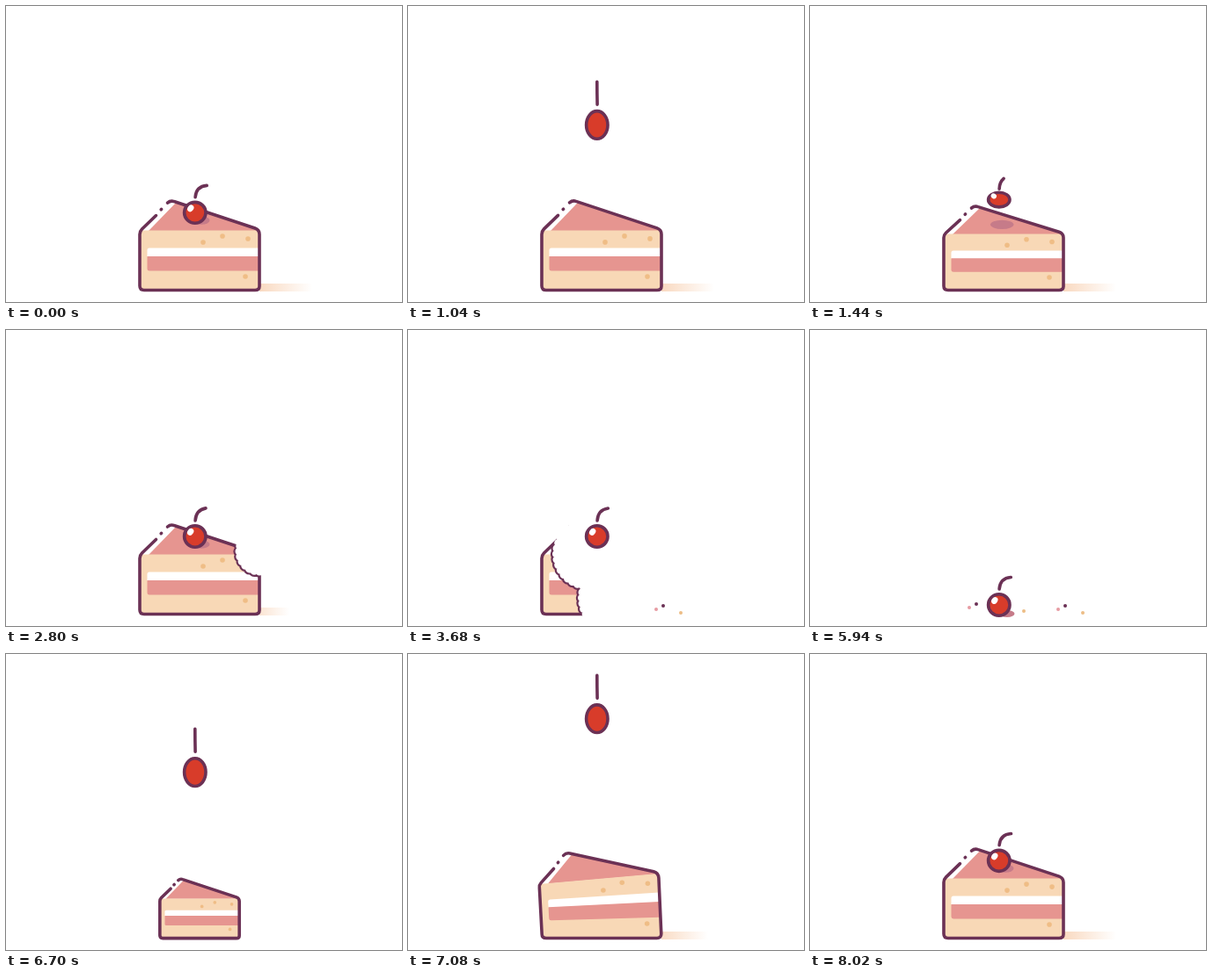
Recreate the animation shown at these times as an HTML page. Size 450 by 337 pixels, loop 8.04 s.

```html
<!DOCTYPE html>
<html lang="en">
<head>
<meta charset="utf-8">
<title>Cake slice</title>
<style>
html, body { margin: 0; width: 100%; height: 100%; overflow: hidden; background: #fff; }
svg { display: block; width: 100%; height: 100%; }
.line { fill: none; stroke: #6b3155; stroke-width: 3.6; stroke-linecap: round; stroke-linejoin: round; }
</style>
</head>
<body>
<svg viewBox="0 0 450 337">
  <defs>
    <linearGradient id="fade">
      <stop offset="0" stop-color="#f9d9c0"/>
      <stop offset="1" stop-color="#f9d9c0" stop-opacity="0"/>
    </linearGradient>
    <clipPath id="inside"><path id="clip"/></clipPath>
  </defs>
  <rect id="floor" x="288" y="316" height="9" fill="url(#fade)"/>
  <g id="cake">
    <path id="base" fill="#fff"/>
    <g id="fills"></g>
    <ellipse id="topShade" fill="#c67b89"/>
    <path id="outline" class="line"/>
    <g clip-path="url(#inside)"><path id="rims" fill="#6b3155"/></g>
    <path id="holes" fill="#fff"/>
  </g>
  <ellipse id="floorShade" fill="#c67b89" cx="224" cy="323" ry="4"/>
  <g id="crumbs"></g>
  <g id="cherry">
    <path id="stem" class="line"/>
    <ellipse id="ball" rx="12.2" fill="#d83c2a" stroke="#6b3155" stroke-width="3.6"/>
    <ellipse id="shine" rx="3.3" fill="#fff"/>
  </g>
</svg>
<script>
const LOOP = 8040, TAU = 2 * Math.PI;
const $ = id => document.getElementById(id);
const set = (el, attrs) => { for (const a in attrs) el.setAttribute(a, attrs[a]); };
const clamp = v => Math.min(1, Math.max(0, v));
const mix = (a, b, p) => a + (b - a) * p;
const smooth = v => { const p = clamp(v); return p * p * (3 - 2 * p); };
const add = (parent, tag, attrs) => {
  const el = document.createElementNS('http://www.w3.org/2000/svg', tag);
  set(el, attrs);
  parent.appendChild(el);
  return el;
};

// Damped swing that starts at zero when d = 0.
const ring = (d, period, decay) => d > 0 ? Math.exp(-d / decay) * Math.sin(TAU * d / period) : 0;

// Heights are those of the cherry's lowest point.
const G = .0026, REBOUND = .25, CAKE_TOP = 249, GROUND = 327, PEAK = 91.5;
const fallTime = h => Math.sqrt(2 * h / G);

const HOP = 818, HOP_RISE = 99, HOP_LAND = HOP + 2 * fallTime(HOP_RISE);
const DROP = 4015, DROP_LAND = DROP + fallTime(GROUND - CAKE_TOP);
const LEAP = 6440, LEAP_LAND = HOP_LAND + 6140, LEAP_TOP = LEAP_LAND - fallTime(CAKE_TOP - PEAK);
const GONE = 4400, REBORN = 6640;

const flights = [
  { start: HOP, land: HOP_LAND, crouch: 178, power: 1 },
  { start: DROP, land: DROP_LAND, crouch: 0, power: .75 },
  { start: LEAP, land: LEAP_LAND, crouch: 500, power: 1 }
];

function bounce(d, rise) {
  for (; rise > .4; rise *= REBOUND) {
    const span = 2 * fallTime(rise);
    if (d < span) return G / 2 * d * (span - d);
    d -= span;
  }
  return 0;
}

function cherryBottom(t) {
  if (t < HOP) return CAKE_TOP;
  if (t < DROP) return CAKE_TOP - bounce(t - HOP, HOP_RISE);
  if (t < DROP_LAND) return CAKE_TOP + G / 2 * (t - DROP) ** 2;
  if (t < LEAP) return GROUND - bounce(t - DROP_LAND, (GROUND - CAKE_TOP) * REBOUND);
  if (t < LEAP_TOP) return mix(PEAK, GROUND, (1 - (t - LEAP) / (LEAP_TOP - LEAP)) ** 3);
  return PEAK + G / 2 * (t - LEAP_TOP) ** 2;
}

// Stretch of the ball and straightness of the stem: crouch, fly, land and wobble.
function cherryPose(t) {
  let squeeze = 0, bow = 0;
  for (const { start, land, crouch, power } of flights) {
    const wait = t - start + crouch, d = t - land;
    if (wait > 0 && t < start) {
      const dip = Math.sin(Math.PI * (wait / crouch) ** 2);
      squeeze = -.26 * dip;
      bow = -.2 * dip;
    } else if (t >= start && d < 0) {
      const air = smooth((t - start) / 110);
      squeeze = .26 * air * power * smooth(-d / 50);
      bow = air * power;
    } else if (d >= 0 && t < start + 2400) {
      squeeze = -.596 * power * Math.exp(-d / 160) * Math.cos(TAU * (d - 70) / 500);
      bow = power * Math.exp(-d / 250) * Math.cos(TAU * d / 700);
    }
  }
  if (t < DROP) for (let i = 0; i < bites.length; i++) bow += .22 * ring(t - biteTime(i), 250, 110);
  return [Math.exp(squeeze), bow];
}

function cakeHeight(t) {
  const jolt = (at, size) => size * ring(t - at, 220, 120);
  const wait = clamp((t - HOP + 178) / 178);
  return 1 - .13 * Math.sin(Math.PI * wait) + jolt(HOP, .12) + jolt(HOP_LAND, -.12) + jolt(6740, .2);
}

function cakeSize(t) {
  const d = t - REBORN;
  if (t < GONE) return 1;
  return d < 0 ? 0 : 1 - Math.exp(-d / 80) * Math.cos(TAU * d / 500);
}

const cakeTilt = t => .235 * ring(t - 6740, 270, 350) * smooth((LEAP_LAND - t) / 250);

// Bites as x, y, radius, in eating order.
const bites = [
  [288, 252, 26.5], [280, 303, 32], [250, 250, 38], [236, 305, 42],
  [205, 255, 40], [186, 258, 33], [184, 282, 30], [186, 332, 24]
];
const biteTime = i => i ? 3067 + 133 * i : 2720;

const PINK = '#e69590', CREAM = '#f8d8b6', DARK = '#6b3155', TAN = '#edbd86';

const crumbs = [
  [181, 316, '#e79ba2'], [189, 312, DARK], [243, 320, TAN],
  [282, 318, '#e79ba2'], [290, 314, DARK], [310, 322, TAN]
].map(([x, y, fill]) => ({ x, y, el: add($('crumbs'), 'circle', { fill }) }));

const EDGE = 'Q187 221 191 222.5 L283 253 Q288 254.8 288 260 L288 319 Q288 323.5 283 323.5 ' +
  'L157 323.5 Q152 323.5 152 318.5 L152 260 Q152 256.5 154.5 254 ';
const BODY = 'M184 224 ' + EDGE + 'Z';
const OUTLINE = 'M183.5 224 ' + EDGE + 'L170.5 238.5 M176.2 231.7 L176.6 231.3';

const layers = [
  [PINK, 'M162 256 L193 224 L283 253 L288 256 Z'],
  [CREAM, 'M152 255.5 L288 255.5 L288 319 Q288 323 283 323 L157 323 Q152 323 152 318 Z'],
  ['#fff', 'M160.5 285.5 L160.5 278 Q160.5 275.5 163 275.5 L287 275.5 L287 285.5 Z'],
  [PINK, 'M160.5 285 L287 285 L287 301.5 L163 301.5 Q160.5 301.5 160.5 299 Z']
].map(([fill, d]) => ({ d, el: add($('fills'), 'path', { fill }) }));

const dots = [[246, 262], [224, 269], [275, 265], [272, 308]]
  .map(p => ({ p, el: add($('fills'), 'circle', { fill: '#efbd86' }) }));

const disc = (x, y, r) => `M${x - r} ${y}a${r} ${r} 0 1 0 ${2 * r} 0a${r} ${r} 0 1 0 ${-2 * r} 0`;

// A round bite with a ring of small tooth marks.
function bitePath([x, y, r], grow) {
  const n = Math.round(r * .9);
  let d = disc(x, y, r - 1 + grow);
  for (let i = 0; i < n; i++) {
    const a = i / n * TAU;
    d += disc(x + (r - 3.5) * Math.cos(a), y + (r - 3.5) * Math.sin(a), 4.5 + grow);
  }
  return d;
}
const holePaths = bites.map(b => bitePath(b, 0));
const rimPaths = bites.map(b => bitePath(b, 2.2));

function drawCake(t, lift, eaten) {
  const q = cakeHeight(t), k = cakeSize(t), w = cakeTilt(t);
  const warp = (x, y) => {
    const h = 324 - y, dx = x - 220;
    return [
      220 + dx * k - 82 * w * (h / 102) ** 2,
      324 - h * k * q * (1 + w * dx / 68)
    ];
  };
  const bend = d => d.replace(/([\d.]+) ([\d.]+)/g, (m, x, y) =>
    warp(+x, +y).map(v => v.toFixed(2)).join(' '));

  $('cake').style.display = k > 0 ? '' : 'none';
  const body = bend(BODY);
  set($('base'), { d: body });
  set($('clip'), { d: body });
  set($('outline'), { d: bend(OUTLINE) });
  for (const { d, el } of layers) set(el, { d: bend(d) });
  for (const { p, el } of dots) {
    const [cx, cy] = warp(...p);
    set(el, { cx, cy, r: 2.8 * Math.max(0, k) });
  }

  const far = clamp(lift / 20);
  const [cx, cy] = warp(222 - 4 * far, 244);
  set($('topShade'), {
    cx, cy, rx: 9.5 + 4 * far, ry: 4.7 + .5 * far,
    opacity: t > REBORN && t < LEAP_TOP ? 0 : clamp(1.6 - lift / 40)
  });
  set($('holes'), { d: holePaths.slice(0, eaten).join('') });
  set($('rims'), { d: rimPaths.slice(0, eaten).join('') });
}

function drawFloor(t, eaten) {
  const width = t < GONE ? Math.max(0, 60 - 26 * eaten)
    : 60 * clamp(1 - Math.exp((6700 - t) / 180));
  set($('floor'), { width, opacity: .3 + width / 85 });
}

function drawCherry(y, sy, bow) {
  const foot = -18 * sy, tipX = 13.5 * (1 - bow), tipY = foot - mix(13.5, 20, bow) * sy;
  const midY = foot - mix(12.5, 10, bow) * sy;
  set($('cherry'), { transform: `translate(214.8 ${y - 14 * sy})` });
  set($('ball'), { ry: 12.2 * sy });
  set($('stem'), { d: `M.3 ${foot}Q${1.2 * (1 - bow)} ${midY} ${tipX} ${tipY}` });
  set($('shine'), {
    cx: -5 - 2 * Math.max(0, bow), cy: -5 * sy, ry: 4.2 * sy,
    transform: `rotate(35 -5 ${-5 * sy})`, opacity: clamp((.8 - bow) * 5)
  });
}

// Crumbs drop off from right to left, later hop and gather under the cherry.
function drawCrumbs(t) {
  const pull = clamp((t - 6440) / 200) ** 2;
  const hop = t > 5940 ? 3 * Math.abs(Math.sin((t - 5940) / 220 * Math.PI)) : 0;
  for (const { x, y, el } of crumbs) {
    const start = 3220 + (310 - x) * 7.4, p = clamp((t - start) / 150);
    set(el, {
      cx: mix(x - 32 * (1 - p), 220, pull),
      cy: mix(y - 72 * (1 - p * p) - hop, 320, pull),
      r: t < start || t > REBORN ? 0 : 2
    });
  }
}

function render(ms) {
  // Both landings on the cake share one settling motion.
  let t = ms;
  if (ms < 400) t = ms + 1900;
  else if (ms >= LEAP_LAND) t = ms - 6140;

  const eaten = t < GONE ? bites.filter((b, i) => t >= biteTime(i)).length : 0;
  let y = cherryBottom(t);
  const lift = CAKE_TOP - y;
  if (t < DROP) y += 75 * (1 - cakeHeight(t)) * clamp(1 - lift / 10);

  drawFloor(t, eaten);
  drawCake(t, lift, eaten);
  const high = GROUND - y;
  set($('floorShade'), {
    rx: 8.5 + 3 * clamp(high / 20),
    opacity: t > DROP && t < REBORN ? clamp(1.4 - high / 30) : 0
  });
  drawCrumbs(t);
  drawCherry(y, ...cherryPose(t));
}

const began = performance.now();
function tick() {
  render((performance.now() - began) % LOOP);
  requestAnimationFrame(tick);
}
tick();
</script>
</body>
</html>
```
